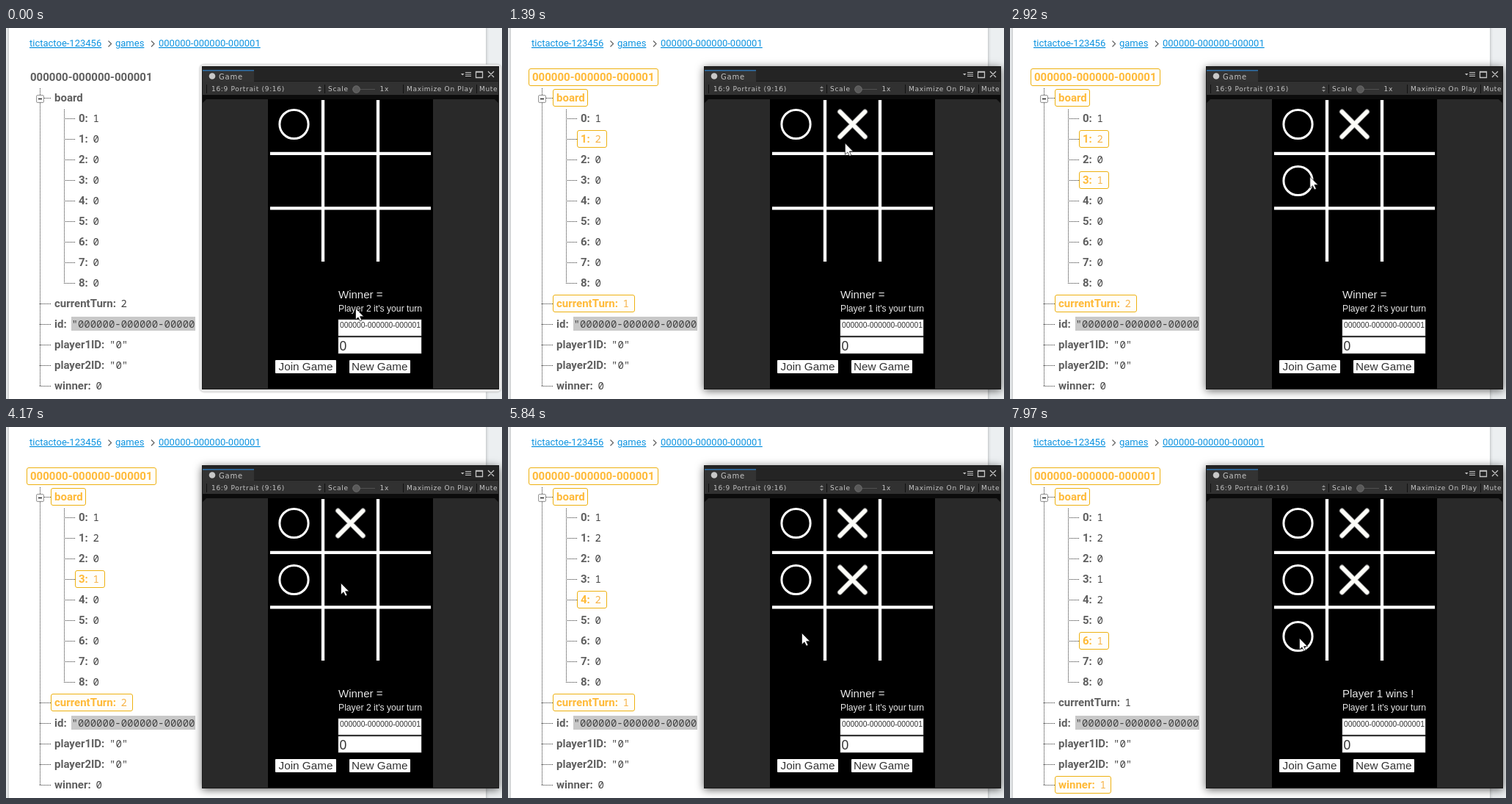
These frames come from a looping animation (676x505 px, 8 s). An HTML page:

```html
<!DOCTYPE html>
<html lang="en">
<head>
<meta charset="utf-8">
<title>Tic-tac-toe database sync</title>
<style>
  html, body { margin: 0; width: 100%; height: 100%; overflow: hidden; background: #eceff1; }
  svg { display: block; width: 676px; height: 505px; }
  text { white-space: pre; }
  .link { font: 13px Roboto, sans-serif; fill: #0d93e0; text-decoration: underline; }
  .key { font: 700 15px Roboto, sans-serif; fill: #5f5f5f; }
  .val { font: 14px "Noto Sans Mono", "DejaVu Sans Mono", monospace; fill: #444; }
  .hot .key { fill: #ffba38; }
  .hot .val { fill: #f7b44a; }
  .box { fill: #fffefa; stroke: #eeb111; visibility: hidden; }
  .hot .box { visibility: visible; }
  .tree { stroke: #333; stroke-dasharray: 1 1; fill: none; shape-rendering: crispEdges; }
  .ui { font: 9px "DejaVu Sans", sans-serif; letter-spacing: .68px; fill: #c4c4c4; }
  .tab { font-size: 10px; letter-spacing: .8px; }
  .game { font-family: "Liberation Sans", Arial, sans-serif; }
  .panel { filter: drop-shadow(0 1px 2px rgba(0,0,0,.3)); }
  .active { filter: drop-shadow(0 2px 6px rgba(0,0,0,.6)); }
  .idle { filter: drop-shadow(0 0 1px rgba(0,0,0,.3)); }
</style>
</head>
<body>
<svg id="stage" viewBox="0 0 676 505"></svg>
<script>
const LOOP = 8000;
const stage = document.getElementById('stage');

function add(tag, attrs = {}, parent = stage, text) {
  const el = document.createElementNS('http://www.w3.org/2000/svg', tag);
  for (const name in attrs) el.setAttribute(name, attrs[name]);
  if (text !== undefined) el.textContent = text;
  parent.appendChild(el);
  return el;
}
const rect = (x, y, width, height, fill, more = {}, parent = stage) =>
  add('rect', { x, y, width, height, fill, ...more }, parent);
const path = (d, more = {}, parent = stage) => add('path', { d, fill: 'none', ...more }, parent);
const label = (x, y, cls, text, parent = stage) => add('text', { x, y, class: cls }, parent, text);
const gameText = (x, y, size, fill, text) =>
  add('text', { x, y, class: 'game', 'font-size': size, fill }, stage, text);

// Value of a step table [[time, value], ...] at time t
const at = (steps, t) => steps.reduce((v, [start, next]) => t >= start ? next : v, steps[0][1]);
const within = (spans, t) => spans.some(([a, b]) => t >= a && t < b);
const show = (el, on) => el.setAttribute('visibility', on ? 'visible' : 'hidden');

// Page
rect(4, -10, 650, 530, '#fff', { class: 'panel' });
label(32, 25, 'link', 'tictactoe-123456');
label(149, 25, 'link', 'games');
label(208, 25, 'link', '000000-000000-000001');
for (const x of [139.5, 198]) path(`M${x} 17.5l4 4-4 4`, { stroke: '#666', 'stroke-width': 1.3 });

// Database tree
let tree = 'M46.5 82V488M79.5 111V348M46 95.5H61';
for (let i = 0; i < 9; i++) tree += `M79 ${123.5 + 28 * i}H94`;
for (let i = 0; i < 5; i++) tree += `M46 ${375.5 + 28 * i}H61`;
path(tree, { class: 'tree' });
rect(41.5, 91.5, 10, 10, '#f4f4f4', { rx: 1.5, stroke: '#999' });
path('M44 96.5h5', { stroke: '#222', 'stroke-width': 1.4 });
rect(89, 393, 169, 19, '#c8c8c8');

const rows = [];
function row(x, y, key, opt = {}) {
  const g = add('g');
  if (opt.width) rect(x - 4.5, y - 11.5, opt.width, 23, '#fff', { class: 'box', rx: 2.5 }, g);
  label(x, y + 5, 'key', key, g);
  const steps = opt.steps || [];
  const val = steps.length ? label(opt.valueX, y + 5, 'val', '', g) : null;
  rows.push({ g, val, steps, hot: opt.hot || [] });
}

const session = [[970, 6530], [7130, LOOP]];
const boardMoves = {
  0: { steps: [[0, '1']] },
  1: { steps: [[0, '0'], [970, '2']], hot: [[970, 2970]] },
  3: { steps: [[0, '0'], [2640, '1']], hot: [[2640, 4640]] },
  4: { steps: [[0, '0'], [4540, '2']], hot: [[4540, 6530]] },
  6: { steps: [[0, '0'], [7130, '1']], hot: [[7130, LOOP]] }
};
row(33, 67, '000000-000000-000001', { width: 176, hot: session });
row(66, 95, 'board', { width: 47, hot: session });
for (let i = 0; i < 9; i++)
  row(99, 123 + 28 * i, i + ':', { width: 40, valueX: 118.5, steps: [[0, '0']], ...boardMoves[i] });
row(66, 375, 'currentTurn:', {
  width: 111, valueX: 156.5, hot: [session[0]],
  steps: [[0, '2'], [970, '1'], [2640, '2'], [4540, '1']]
});
row(66, 403, 'id:', { valueX: 89.5, steps: [[0, '"000000-000000-00000']] });
row(66, 431, 'player1ID:', { valueX: 141, steps: [[0, '"0"']] });
row(66, 459, 'player2ID:', { valueX: 141, steps: [[0, '"0"']] });
row(66, 487, 'winner:', {
  width: 76, valueX: 122.5, hot: [session[1]], steps: [[0, '0'], [7130, '1']]
});

// Editor window
const idleEdge = rect(264, 49.5, 411, 446, '#e6e6e6', { rx: 6, class: 'idle' });
const activeEdge = rect(267, 52, 405, 440, '#222', { class: 'active' });
rect(267, 52, 405, 440, '#191919');
rect(268, 53, 403, 19, '#242424');
rect(268, 57, 70, 16, '#333');
rect(268, 57, 70, 1.6, '#2f6ea5');
rect(268, 73, 403, 18, '#313131');
rect(268, 91, 403, 6, '#0c0c0c');
rect(268, 97, 403, 394, '#292929');
path('M268 97h5l-5 5zM671 97h-5l5 5z', { fill: '#0c0c0c' });
add('circle', { cx: 281, cy: 65.5, r: 4.3, fill: '#c8c8c8' });
label(290, 69.5, 'ui tab', 'Game');
label(280, 86, 'ui', '16:9 Portrait (9:16)');
label(439, 86, 'ui', 'Scale');
label(509.5, 86, 'ui', '1x');
label(546, 86, 'ui', 'Maximize On Play');
label(645, 86, 'ui', 'Mute');
path('M273.5 77v12M434.5 77v12M541.5 77v12M641.5 77v12', { stroke: '#111' });
path('M425 82l2.5-3 2.5 3zM425 84l2.5 3 2.5-3z', { fill: '#8a8a8a' });
path('M472 83.5h31', { stroke: '#505050' });
add('circle', { cx: 477.5, cy: 83.5, r: 4.8, fill: '#595959', stroke: '#777', 'stroke-width': .8 });
path('M620 62h4.500l-2.250 2.500z', { fill: '#c4c4c4' });
path('M626 60.500h8M626 63h8M626 65.500h8', { stroke: '#c4c4c4', 'stroke-width': 1.2 });
path('M640.500 59.500h9v8h-9zM640 60h10M657 59l8 8M665 59l-8 8', { stroke: '#c4c4c4', 'stroke-width': 1.3 });

// Game view
rect(357, 97, 225, 394, '#000');
path('M432 98V318M507 98V318M360 170.8H579M360 245.4H579', { stroke: '#fff', 'stroke-width': 4.3 });

const marks = [['O', 0, 0, 0], ['X', 1, 0, 830], ['O', 0, 1, 2500], ['X', 1, 1, 4400], ['O', 0, 2, 6990]]
  .map(([kind, col, line, start]) => {
    const g = add('g', { transform: `translate(${392.5 + 77 * col} ${131 + 77 * line})` });
    if (kind === 'O') {
      add('circle', { r: 19.6, fill: 'none', stroke: '#fff', 'stroke-width': 3 }, g);
    } else {
      const d = 'M-17-17L17 17M17-17L-17 17';
      path(d, { stroke: '#777', 'stroke-width': 7.4, 'stroke-linecap': 'round' }, g);
      path(d, { stroke: '#fdfdf8', 'stroke-width': 5.4, 'stroke-linecap': 'round' }, g);
    }
    return { g, start };
  });

const result = gameText(453, 368, 15, '#e6e6e6', '');
const turn = gameText(453, 386, 12.2, '#e6e6e6', '');
for (const y of [397, 421]) rect(453, y, 113, 22, '#fff', { stroke: '#aaa', 'stroke-width': .6 });
gameText(455, 408, 10.3, '#333', '000000-000000-000001');
gameText(454.5, 438.5, 17.5, '#333', '0');
for (const x of [367, 468]) rect(x, 452, 83, 18, '#fff', { rx: 1 });
gameText(371.5, 466, 15.3, '#333', 'Join Game');
gameText(471, 466, 15.3, '#333', 'New Game');

// Pointer
const pointer = path('M.5.5V16L4 12.800 6.600 18 9 17 6.500 11.700H11.500Z',
  { fill: '#fff', stroke: '#111', 'stroke-width': .7 });
const halo = add('circle', { r: 12, fill: '#ffeb00', opacity: .5 });

const clicks = [[740, 830], [2410, 2500], [4310, 4400], [6900, 6990]];
const smooth = u => u * u * (3 - 2 * u);
const easeOut = u => 1 - (1 - u) ** 1.6;
const linear = u => u;
// first step, last step, number of steps, end point, easing, sideways bend
const moves = [
  [50, 560, 12, 467, 150, smooth, -23.5],
  [1390, 1710, 8, 402, 200, linear],
  [2360, 2360, 1, 404, 201, linear],
  [2920, 3390, 11, 452, 211, linear],
  [4170, 4170, 1, 456, 212, linear],
  [4770, 5330, 12, 417, 267, smooth],
  [5380, 5840, 10, 400, 280, easeOut],
  [6860, 6860, 1, 400, 281, linear],
  [7970, 7970, 1, 394, 287, linear]
];
function pointerAt(t) {
  let x = 476, y = 381;
  for (const [a, b, n, endX, endY, ease, bend = 0] of moves) {
    if (t < a) break;
    const step = t >= b ? n : 1 + Math.floor((t - a) / (b - a) * (n - 1));
    const u = ease(step / n);
    x += (endX - x) * u + 2 * bend * u * (1 - u);
    y += (endY - y) * u;
  }
  return [x, y];
}

function render(t) {
  for (const { g, val, steps, hot } of rows) {
    g.setAttribute('class', within(hot, t) ? 'hot' : '');
    if (val) val.textContent = at(steps, t);
  }
  for (const { g, start } of marks) show(g, t >= start);
  result.textContent = t < 6990 ? 'Winner =' : 'Player 1 wins !';
  const player = at([[0, 2], [830, 1], [2500, 2], [4400, 1]], t);
  turn.textContent = `Player ${player} it's your turn`;
  show(idleEdge, t < 740);
  show(activeEdge, t >= 740);
  const place = `translate(${pointerAt(t)})`;
  pointer.setAttribute('transform', place);
  halo.setAttribute('transform', place);
  show(halo, within(clicks, t));
}

const begin = performance.now();
function tick() {
  render((performance.now() - begin) % LOOP);
  requestAnimationFrame(tick);
}
tick();
</script>
</body>
</html>
```
